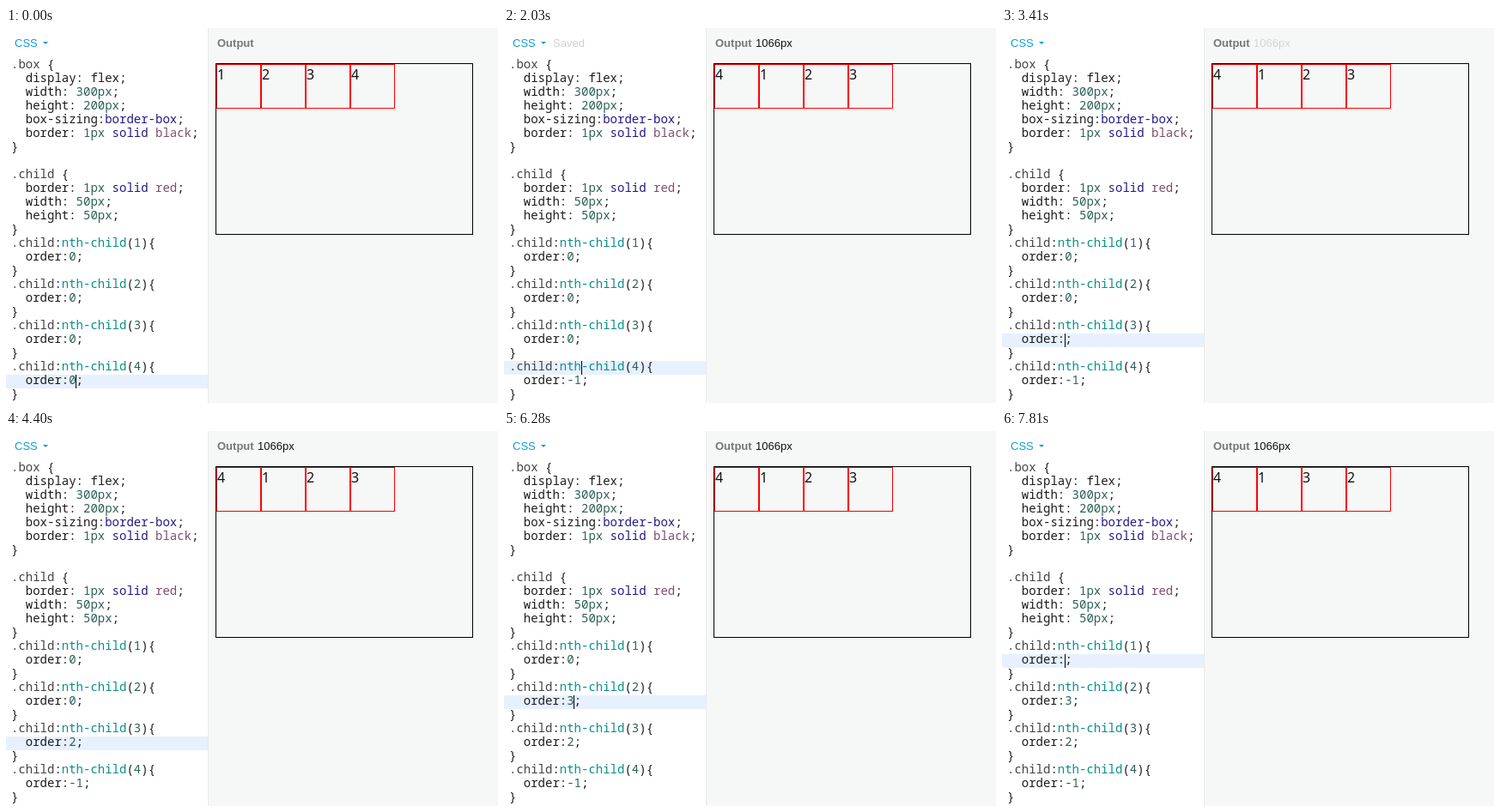
These frames come from a looping animation (573x437 px, 8000 ms). An HTML page:

```html
<!DOCTYPE html>
<html lang="en">
<head>
<meta charset="utf-8">
<title>Flex order</title>
<style>
  html, body { margin: 0; height: 100%; overflow: hidden; background: #fff; }
  svg { display: block; width: 573px; height: 437px; }
  text { white-space: pre; }
  .code { font: 14px "Noto Sans Mono", monospace; fill: #1c1c1c; }
  .ui { font: 13px "Liberation Sans", Arial, sans-serif; }
  .digit { font: 16px "Noto Sans", sans-serif; fill: #111; }
  .pseudo { fill: #0a8f8a; }
  .number { fill: #2c6157; }
  .atom { fill: #221a88; }
  .color { fill: #7d4f6b; }
  .class { fill: #444; }
</style>
</head>
<body>
<svg viewBox="0 0 573 437">
  <rect x="236" width="337" height="437" fill="#f6f7f7"/>
  <rect x="235" width="1" height="437" fill="#e8e9e9"/>
  <rect id="band" width="235" height="16" fill="#e7f1fe"/>
  <g class="ui">
    <text x="10" y="22" fill="#0a9fd8">CSS</text>
    <path d="M43 16h6l-3 3z" fill="#0a9fd8"/>
    <text id="saved" x="57" y="22" fill="#aaa">Saved</text>
    <text x="246" y="22" fill="#777" font-weight="bold">Output</text>
    <text id="size" x="293" y="22" fill="#111">1066px</text>
  </g>
  <g id="code" class="code"></g>
  <rect id="caret" width="1" height="16" fill="#000"/>
  <rect x="244.5" y="41.5" width="299" height="199" fill="none" stroke="#000"/>
  <g id="boxes"></g>
</svg>
<script>
const $ = id => document.getElementById(id);
const LOOP = 8000, TOP = 36, LINE = 16, LEFT = 6, CHAR = 8.4;

const source = [
  '.box {', '  display: flex;', '  width: 300px;', '  height: 200px;',
  '  box-sizing:border-box;', '  border: 1px solid black;', '}', '',
  '.child {', '  border: 1px solid red;', '  width: 50px;', '  height: 50px;', '}'
];
for (let n = 1; n <= 4; n++) source.push(`.child:nth-child(${n}){`, '  order:0;', '}');
const orderLine = n => 11 + 3 * n;

const tokens = /(nth-child)|(-?\d+(?:px)?)|(solid|border-box)|(black|red)|(\.[a-z]+)/g;
const kinds = ['pseudo', 'number', 'atom', 'color', 'class'];
const highlight = line => line.replace(tokens, (match, ...groups) =>
  `<tspan class="${kinds[groups.findIndex((g, i) => i < kinds.length && g)]}">${match}</tspan>`);

$('code').innerHTML = source.map((line, i) =>
  `<text x="${LEFT}" y="${TOP + LINE * i + 11}">${highlight(line)}</text>`).join('');
$('boxes').innerHTML = [0, 1, 2, 3].map(i =>
  `<rect x="${245.5 + 52 * i}" y="42.5" width="51" height="51" fill="none" stroke="#f00"/>
   <text class="digit" x="${246 + 52 * i}" y="60"></text>`).join('');
const digits = document.querySelectorAll('.digit');

const start = { line: 23, col: 9, caret: 1, saved: 0, size: 0, boxes: '1234', o1: '0', o2: '0', o3: '0', o4: '0' };

// Each step lists only what changes at that time.
const steps = [
  [70, { caret: 0 }],
  [550, { o4: '', col: 8, caret: 1 }],
  [850, { o4: '-', col: 9, size: 1 }],
  [1160, { o4: '-1', col: 10 }],
  [1310, { boxes: '4123' }],
  [1630, { caret: 0 }],
  [1930, { line: 22, caret: 1, saved: .05 }],
  [2020, { saved: .55 }],
  [2110, { line: 21, col: 1, saved: 1 }],
  [2390, { line: 20, col: 10 }],
  [2940, { col: 9 }],
  [3250, { o3: '', col: 8, saved: 0, size: .85 }],
  [3330, { size: .5 }],
  [3410, { size: .15 }],
  [3490, { size: 0 }],
  [3710, { size: 1 }],
  [3940, { o3: '2', col: 9 }],
  [4400, { caret: 0 }],
  [4480, { line: 19, caret: 1 }],
  [4710, { line: 18, col: 1, saved: .03 }],
  [4800, { saved: .55 }],
  [4880, { saved: 1 }],
  [5260, { caret: 0 }],
  [5330, { line: 17, col: 9, caret: 1 }],
  [5730, { o2: '', col: 8, saved: 0 }],
  [6280, { o2: '3', col: 9 }],
  [6510, { boxes: '4132' }],
  [6590, { saved: .05 }],
  [6670, { saved: .55 }],
  [6740, { saved: 1, caret: 0 }],
  [6890, { line: 16, caret: 1 }],
  [7120, { line: 15, col: 1 }],
  [7350, { line: 14, col: 9 }],
  [7810, { o1: '', col: 8, saved: 0 }]
];

let shown = -1;
function draw() {
  const t = performance.now() % LOOP;
  const past = steps.filter(([time]) => time <= t);
  if (past.length !== shown) {
    shown = past.length;
    const state = Object.assign({}, start, ...past.map(([, change]) => change));
    const y = TOP + LINE * state.line;
    $('band').setAttribute('y', y);
    $('caret').setAttribute('y', y);
    $('caret').setAttribute('x', Math.floor(LEFT + CHAR * state.col));
    for (const id of ['caret', 'saved', 'size']) $(id).style.opacity = state[id];
    for (let n = 1; n <= 4; n++) {
      $('code').children[orderLine(n)].innerHTML = highlight(`  order:${state['o' + n]};`);
      digits[n - 1].textContent = state.boxes[n - 1];
    }
  }
  requestAnimationFrame(draw);
}
draw();
</script>
</body>
</html>
```
